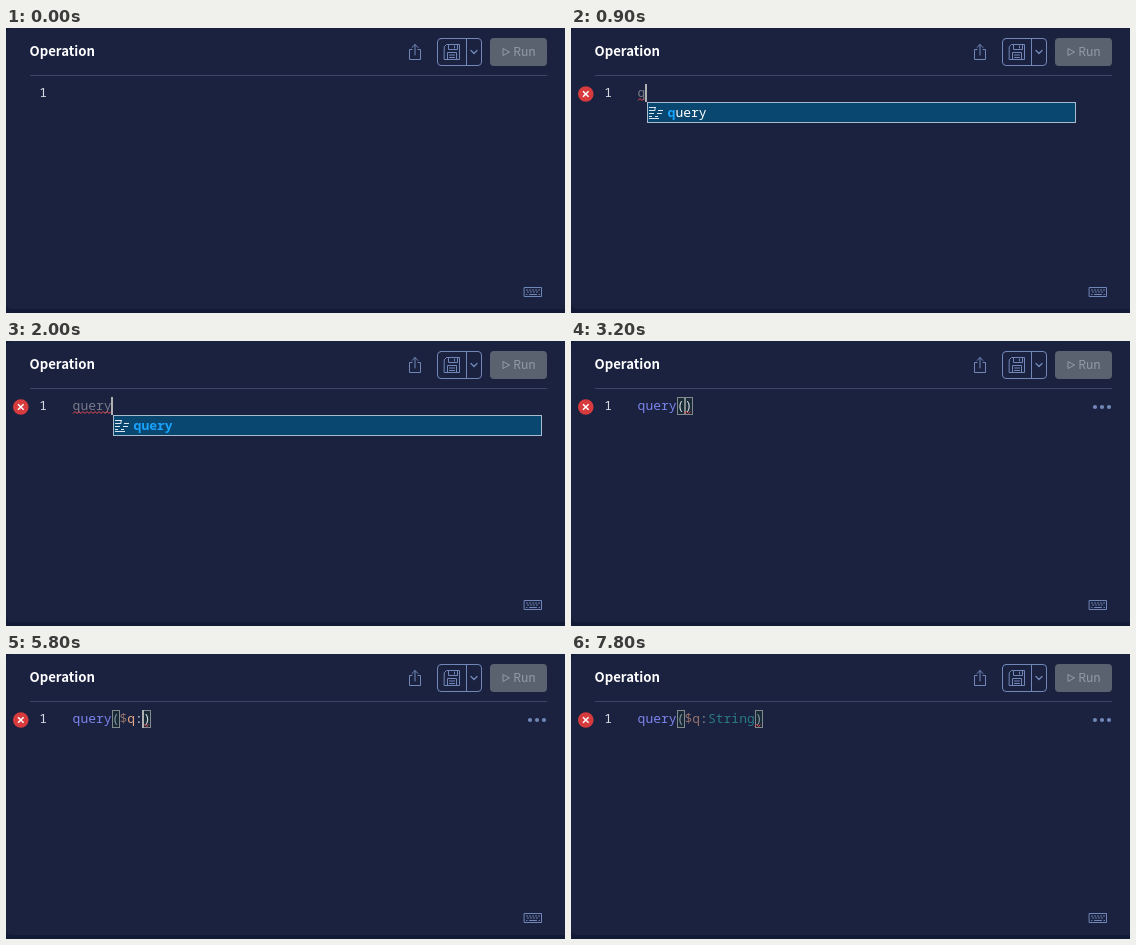
An HTML page that plays this animation: 559x285 px, repeating every 8 s.

```html
<!DOCTYPE html>
<html lang="en">
<head>
<meta charset="utf-8">
<title>Operation editor</title>
<style>
  html, body { margin: 0; width: 100%; height: 100%; overflow: hidden; background: #131a35; }
  svg { display: block; width: 559px; height: 285px; }
  .ui { font-family: "Noto Sans CJK JP", "Noto Sans CJK SC", "Noto Sans", sans-serif; }
  .code { font: 13px "Noto Sans Mono", "Liberation Mono", monospace; white-space: pre; }
  .icon { fill: none; stroke: #7187b8; stroke-width: 1; stroke-linejoin: round; stroke-linecap: round; }
</style>
</head>
<body>
<svg viewBox="0 0 559 285">
  <rect width="570" height="281" rx="6" fill="#1b2240"/>
  <text class="ui" x="23.5" y="28" font-size="13.2" font-weight="700" fill="#fff">Operation</text>
  <path d="M24 47.5H541" stroke="#3b4567"/>

  <g class="icon">
    <!-- share -->
    <path d="M406 21.5H403.5V31.5H414.5V21.5H412M409 27V16.5M406 19.5L409 16.5L412 19.5"/>
    <!-- save button -->
    <rect x="431.5" y="10.5" width="44" height="27" rx="3.5"/>
    <path d="M460.5 11V37"/>
    <path d="M438.5 18.5L440.5 16.5H453.5V31.5H438.5ZM442.5 16.5V21.5H451.5V16.5M448.5 18V20M441.5 31.5V24.5H450.5V31.5M443.5 27H448.5M443.5 29.5H448.5"/>
    <path d="M465 22.5L468 25.5L471 22.5" stroke-width="1.3"/>
    <!-- keyboard -->
    <rect x="518.5" y="259.5" width="17" height="9"/>
    <path d="M520.5 262H533.5M521.5 264H533" stroke-dasharray="1 2"/>
    <path d="M520.5 266.5H521M523.5 266.5H530.5M533 266.5H533.5"/>
  </g>

  <rect x="484" y="10" width="57" height="28" rx="4" fill="#5b626f"/>
  <path d="M497 20.5V27.5L503.5 24Z" fill="none" stroke="#9299a8" stroke-linejoin="round"/>
  <text class="ui" x="507.2" y="27.5" font-size="12.2" fill="#9299a8">Run</text>

  <text class="code" x="33.2" y="69" fill="#d8dae2">1</text>
  <g id="editor"></g>
</svg>
<script>
const LOOP = 8000, CHAR = 7.8, LEFT = 66.6, BASELINE = 69;
const editor = document.getElementById("editor");

// time, typed text, caret visible, extra state
const steps = [
  [0, "", 0],
  [400, "", 1],
  [800, "q", 1, { fresh: true }],
  [900, "q", 1, { popup: true }],
  [1200, "qu", 1, { popup: true }],
  [1300, "que", 1, { popup: true }],
  [1600, "quer", 1, { popup: true }],
  [2000, "query", 1, { popup: true }],
  [2100, "query", 1],
  [2400, "query", 0],
  [2800, "query(", 1, { fresh: true }],
  [2900, "query(", 1],
  [3200, "query(", 0],
  [3700, "query(", 1],
  [4200, "query(", 0],
  [4600, "query($", 1],
  [5000, "query($q", 1],
  [5100, "query($q", 1, { fadeTo: 7 }],
  [5500, "query($q", 0, { fadeTo: 7 }],
  [5800, "query($q:", 1, { fadeTo: 7 }],
  [5900, "query($q:", 1, { fadeTo: 99 }],
  [6200, "query($q:S", 1, { fadeTo: 99 }],
  [6600, "query($q:St", 1, { fadeTo: 99 }],
  [6700, "query($q:Str", 1, { fadeTo: 99 }],
  [6900, "query($q:Stri", 1, { fadeTo: 99 }],
  [7000, "query($q:Strin", 1, { fadeTo: 99 }],
  [7400, "query($q:String", 1, { fadeTo: 99 }],
  [7800, "query($q:String", 0, { fadeTo: 99 }]
];

const columnX = n => LEFT + n * CHAR;

function charColor(i, char, isKeyword) {
  if (i < 5) return isKeyword ? "#7b83eb" : "#777a87";
  if ("():".includes(char)) return "#d4d8da";
  return i < 8 ? "#e2a584" : "#36b5ad";
}

function squiggle(from, to) {
  let path = `M${from} 72.5`;
  for (let x = from + 2, up = true; x <= to; x += 2, up = !up) path += `L${x} ${up ? 70.5 : 72.5}`;
  return `<path d="${path}" fill="none" stroke="#ef4a4d"/>`;
}

function bracketBox(column) {
  const x = Math.floor(columnX(column)) + 1.5;
  return `<rect x="${x}" y="56.5" width="7" height="17" fill="#006400" fill-opacity=".12" stroke="#838a8c"/>`;
}

function popup(typed) {
  const n = typed.length, x = Math.round(68 + n * CHAR);
  return `<rect x="${x + .5}" y="74.5" width="428" height="20" fill="#0a4770" stroke="#a9bccb"/>
    <path transform="translate(${x + 2} 79)" fill="none" stroke="#dce5ec"
      d="M0 .5H7M0 3.5H2M0 6.5H5M0 9.5H3M9 3.5H14M8 6.5H13M6 9.5H9M0 11.5H10M2 3.5H6V1"/>
    <text class="code" x="${x + 20.6}" y="89" fill="#fff"><tspan fill="#18a3ff" font-weight="700">${typed}</tspan>${"query".slice(n)}</text>`;
}

const errorBadge = `<circle cx="14.8" cy="66" r="7.8" fill="#d83b3d"/>
  <path d="M12 63.2L17.6 68.8M17.6 63.2L12 68.8" stroke="#fff" stroke-width="1.5"/>`;
const menuDots = [524, 531, 538].map(x => `<circle cx="${x}" cy="66" r="2.1" fill="#7187b8"/>`).join("");

function draw([time, typed, caret, { popup: open, fresh, fadeTo = 0 } = {}]) {
  const n = typed.length;
  const hasCall = n > 5, isKeyword = n >= 5 && !open;
  const text = hasCall ? typed + ")" : typed;
  let out = "";

  if (n && !(fresh && n === 1)) out += errorBadge;
  if (isKeyword) out += menuDots;
  if (hasCall && !fresh) out += bracketBox(5) + bracketBox(n);

  const spans = [...text].map((char, i) =>
    `<tspan fill="${charColor(i, char, isKeyword)}" fill-opacity="${i >= 5 && i < fadeTo ? .6 : 1}">${char}</tspan>`);
  out += `<text class="code" x="${LEFT}" y="${BASELINE}">${spans.join("")}</text>`;

  if (hasCall && !fresh) out += squiggle(columnX(n), columnX(n + 1));
  else if (n && !(fresh && n === 1)) out += squiggle(67, columnX(Math.min(n, 5)));

  if (open) out += popup(typed);
  if (caret) {
    const x = Math.max(67, Math.floor(66.3 + n * CHAR));
    out += `<rect x="${x}" y="56" width="2" height="18" fill="#aeb0b2"/>`;
  }
  editor.innerHTML = out;
}

const start = performance.now();
let current;

function tick() {
  const time = (performance.now() - start) % LOOP;
  const step = steps.findLast(([from]) => from <= time);
  if (step !== current) draw(current = step);
  requestAnimationFrame(tick);
}
tick();
</script>
</body>
</html>
```
